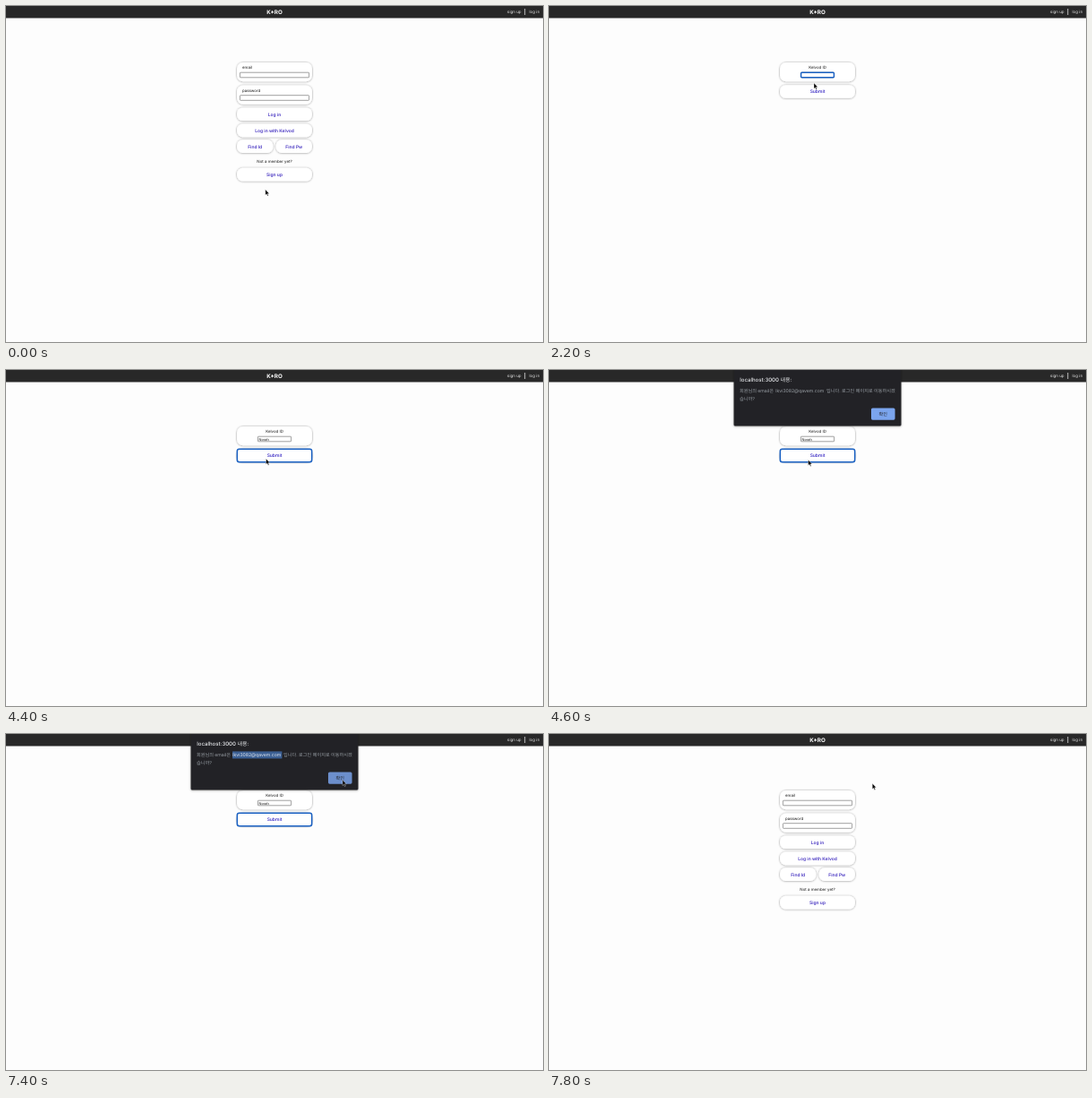
An HTML page that plays this animation: 600 px wide and 375 px high, repeating every 8 s.

```html
<!DOCTYPE html>
<html lang="ko">
<head>
<meta charset="utf-8">
<title>Find ID</title>
<style>
html, body { margin: 0; width: 100%; height: 100%; overflow: hidden; background: #fdfdfd; }
svg { display: block; width: 100vw; height: 100vh; }
text { font-family: Inter, "Noto Sans CJK KR", "Noto Sans CJK", sans-serif; text-rendering: geometricPrecision; white-space: pre; }
.mid { text-anchor: middle; }
.label { font-size: 4.4px; fill: #111; }
.nav { font-size: 4.5px; fill: #e6e6e6; }
.btn { font-size: 4.95px; font-weight: 600; fill: #4330c0; }
.submit { font-size: 5px; font-weight: 500; fill: #2c1cc0; }
.typed { font-size: 3.9px; fill: #111; }
.head { font-size: 6.05px; font-weight: 500; fill: #e8eaed; }
.body { font-size: 5.15px; fill: #9aa0a6; }
.ok { font-size: 5.1px; font-weight: 500; fill: #202124; }
.field { fill: #fff; stroke: #777; stroke-width: .7; }
.ring { fill: none; stroke: #1b62c4; stroke-width: 1.5; }
</style>
</head>
<body>
<svg id="stage" viewBox="0 0 600 375" preserveAspectRatio="none">
  <defs>
    <filter id="soft" x="-20%" y="-50%" width="140%" height="200%">
      <feDropShadow dx="0" dy="0.2" stdDeviation="1.15" flood-color="#000" flood-opacity=".45"/>
    </filter>
    <filter id="deep" x="-10%" y="-20%" width="120%" height="140%">
      <feDropShadow dx="0" dy="0.4" stdDeviation="1.3" flood-color="#000" flood-opacity=".4"/>
    </filter>
  </defs>
  <rect width="600" height="375" fill="#fdfdfd"/>
  <rect width="600" height="13.5" fill="#282828"/>
</svg>
<script>
const NS = "http://www.w3.org/2000/svg";
const LOOP = 8000, STEP = 200;
const NAME = "Norah", MAIL = "lkvi3082@qavem.com";
const stage = document.getElementById("stage");

function add(parent, tag, attrs = {}, content) {
  const el = document.createElementNS(NS, tag);
  for (const k in attrs) el.setAttribute(k, attrs[k]);
  if (content !== undefined) el.textContent = content;
  parent.appendChild(el);
  return el;
}
const group = (parent = stage) => add(parent, "g");
const box = (p, x, y, width, height, rx, more) => add(p, "rect", { x, y, width, height, rx, ...more });
const label = (p, x, y, cls, s) => add(p, "text", { x, y, class: cls }, s);
const card = (p, x, y, w, h) => box(p, x, y, w, h, Math.min(7, h / 2.3), { fill: "#fff", filter: "url(#soft)" });
const field = (p, x, y, w) => box(p, x, y, w, 5.6, 0.7, { class: "field" });
function button(p, x, y, w, s, cls = "btn") {
  card(p, x, y, w, 14.6);
  label(p, x + w / 2, y + 9.2, cls + " mid", s);
}
const show = (el, on) => el.setAttribute("visibility", on ? "visible" : "hidden");

// Header
label(stage, 300, 8.5, "mid", "K*RO").setAttribute("style", "font-size:6.3px;font-weight:700;fill:#fff");
label(stage, 560, 8, "nav", "sign up");
box(stage, 579.4, 3, 0.8, 7, 0, { fill: "#e6e6e6" });
label(stage, 584.5, 8, "nav", "log in");

// Login page
const login = group();
[[63, "email"], [88.5, "password"]].forEach(([y, s]) => {
  card(login, 258, y, 84, 21.3);
  label(login, 264, y + 7.1, "label", s);
  field(login, 261.4, y + 11.2, 77.2);
});
button(login, 258, 113.4, 84, "Log in");
button(login, 258, 131.6, 84, "Log in with Kelvod");
button(login, 258, 149.3, 40.4, "Find Id");
button(login, 301.6, 149.3, 40.4, "Find Pw");
label(login, 300, 175, "label mid", "Not a member yet?");
button(login, 258, 180.8, 84, "Sign up");

// Find ID page
const find = group();
card(find, 258, 63, 84, 21.3);
label(find, 300, 70.1, "label mid", "Kelvod ID");
field(find, 281.4, 74.2, 37.2);
const inputRing = box(find, 281.6, 74.3, 36.8, 5.4, 1, { class: "ring" });
const typed = label(find, 282.5, 78.5, "typed", "");
const caret = box(find, 282.5, 75.2, 0.5, 3.8, 0, { fill: "#111" });
button(find, 258, 88.2, 84, "Submit", "submit");
const submitRing = box(find, 258.3, 88.2, 83.4, 14.5, 2.2, { class: "ring" });

// Alert dialog
const dialog = group();
box(dialog, 206.5, -4, 187, 66.6, 1.5, { fill: "#212427", filter: "url(#deep)" });
label(dialog, 213.3, 13.4, "head", "localhost:3000 내용:");
const mark = box(dialog, 253, 19.4, 0, 8, 0, { fill: "#3b5f93" });
label(dialog, 213, 25.2, "body", "회원님의 email은");
const mail = label(dialog, 253.2, 25.2, "body", MAIL);
label(dialog, 310, 25.2, "body", "입니다. 로그인 페이지로 이동하시겠");
label(dialog, 213, 33.6, "body", "습니까?");
const okBox = box(dialog, 360, 42.5, 26.6, 13.2, 1.6);
label(dialog, 373.3, 50.9, "ok mid", "확인");

// Pointers
const arrow = add(stage, "path", {
  d: "M0 0V6.3L1.4 5 2.4 7.3 3.4 6.9 2.4 4.6H4.3Z",
  fill: "#000", stroke: "#fff", "stroke-width": 0.35
});
const beam = add(stage, "path", {
  d: "M-1.3-3.2Q0-3.2 0-2.4Q0-3.2 1.3-3.2M0-2.4V2.4M-1.3 3.2Q0 3.2 0 2.4Q0 3.2 1.3 3.2",
  fill: "none", stroke: "#111", "stroke-width": 0.7
});

// time, x, y, pointer kind
const path = [
  [0, 289.8, 204.8, "arrow"], [600, 278.3, 157, "arrow"], [800, 278.3, 148, "arrow"],
  [1200, 278.3, 61.5, "arrow"], [1400, 287, 76, "beam"], [1600, 290, 77, "beam"],
  [1800, 291, 88, "arrow"], [2000, 291, 88, "arrow"], [2200, 296, 86, "arrow"],
  [2400, 294, 77, "beam"], [2600, 294, 77, "beam"], [2800, 296, 88, ""],
  [3200, 297, 88, "arrow"], [3400, 297, 88, ""], [4200, 295, 97, "arrow"],
  [4400, 290.5, 99, "arrow"], [4600, 289.6, 100.3, "arrow"], [4800, 289.6, 100.3, "arrow"],
  [5000, 286, 74, "arrow"], [5400, 232, 26, "beam"], [5800, 252.5, 23.5, "beam"],
  [6200, 303.2, 25, "beam"], [6400, 309, 25, "beam"], [6600, 322, 52, "arrow"],
  [6800, 342, 90, "arrow"], [7200, 380, 58, "arrow"], [7400, 376, 51.2, "arrow"],
  [7600, 373, 52.5, "arrow"], [7800, 361.3, 55.2, "arrow"]
];
// time, letters typed
const keys = [[2800, 1], [3200, 2], [3400, 3], [3800, 4], [4000, 5]];

function pointerAt(t) {
  let i = path.length - 1;
  while (path[i][0] > t) i--;
  const a = path[i], b = path[i + 1] || a;
  const k = b === a ? 0 : (t - a[0]) / (b[0] - a[0]);
  return { x: a[1] + (b[1] - a[1]) * k, y: a[2] + (b[2] - a[2]) * k, kind: a[3] };
}

function draw(ms) {
  const t = Math.floor(ms % LOOP / STEP) * STEP;
  const within = (a, b) => t >= a && t < b;

  login.style.display = within(800, 7800) ? "none" : "";
  find.style.display = within(800, 7800) ? "" : "none";
  dialog.style.display = within(4600, 7600) ? "" : "none";

  const count = keys.filter(k => k[0] <= t).length;
  typed.textContent = NAME.slice(0, count);
  const editing = within(1600, 4400);
  show(inputRing, editing);
  show(caret, editing && !within(2200, 2400));
  caret.setAttribute("x", 282.5 + (count ? typed.getComputedTextLength() + 0.2 : 0));
  show(submitRing, t >= 4400);

  const p = pointerAt(t);
  const end = t < 6000 ? 253 : t < 6400 ? p.x : 308.4;
  mark.setAttribute("width", end - 253);
  mail.style.fill = t >= 6000 ? "#dfe5ee" : "";
  okBox.setAttribute("fill", t >= 7400 ? "#6c8fcc" : "#7ba5ee");

  for (const [el, kind] of [[arrow, "arrow"], [beam, "beam"]]) {
    show(el, p.kind === kind);
    el.setAttribute("transform", `translate(${p.x} ${p.y})`);
  }
  beam.setAttribute("stroke", p.y < 62 ? "#e8eaed" : "#111");
}

const start = performance.now();
function tick() {
  draw(performance.now() - start);
  requestAnimationFrame(tick);
}
for (const el of [find, dialog]) el.style.display = "none";
tick();
</script>
</body>
</html>
```
